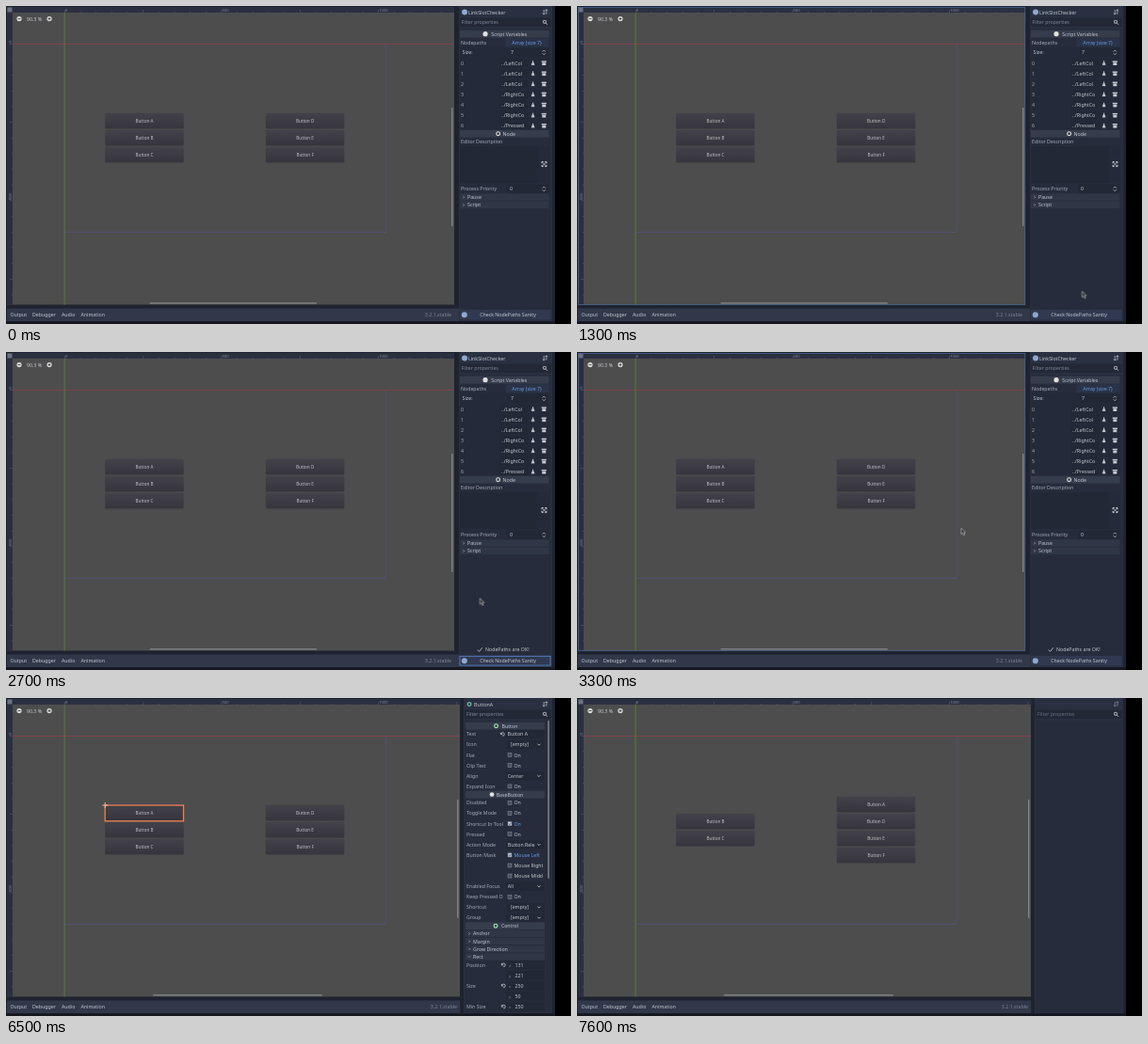
An HTML page that plays this animation: 600x338 px, repeating every 8000 ms.

```html
<!DOCTYPE html>
<html lang="en">
<head>
<meta charset="utf-8">
<title>Editor walkthrough</title>
<style>
html, body { margin: 0; width: 100%; height: 100%; overflow: hidden; background: #000; }
svg { display: block; width: 100%; height: 100%; }
text { font: 5.25px "Noto Sans", "Open Sans", sans-serif; fill: #c3c7d0; white-space: pre; }
text.dim { fill: #a5abb8; }
text.faint { fill: #7f8697; }
text.ghost { fill: #656c7c; }
text.blue { fill: #699ce8; }
text.tiny { font-size: 4.6px; fill: #c2c2c4; }
text.mark { font-size: 4.2px; fill: #858b99; }

.early, .wide, .picked, .done, .view, .focus, .press, .hover, .toast, .cursor {
  animation: 8s step-end infinite;
}
.early { animation-name: early; }
.wide { animation-name: wide; }
.picked { animation-name: picked; }
.done { animation-name: done; }
.view { animation-name: view; }
.focus { animation-name: focus; }
.press { animation-name: press; }
.hover { animation-name: hover; }
.toast { animation-name: toast; }
.cursor { animation-name: shown, move; }

@keyframes early { 0% { opacity: 1 } 81.25%, 100% { opacity: 0 } }
@keyframes wide { 0% { opacity: 0 } 81.25%, 100% { opacity: 1 } }
@keyframes picked { 0% { opacity: 0 } 81.25% { opacity: 1 } 95%, 100% { opacity: 0 } }
@keyframes done { 0% { opacity: 0 } 95%, 100% { opacity: 1 } }
@keyframes view { 0% { opacity: 0 } 2.5% { opacity: 1 } 25% { opacity: 0 } 38.75% { opacity: 1 } 81.25%, 100% { opacity: 0 } }
@keyframes focus { 0% { opacity: 0 } 25% { opacity: 1 } 38.75%, 100% { opacity: 0 } }
@keyframes press { 0% { opacity: 0 } 25% { opacity: 1 } 27.5%, 100% { opacity: 0 } }
@keyframes hover { 0% { fill: #c3c7d0 } 21.25% { fill: #e6e9ef } 25% { fill: #699ce8 } 27.5% { fill: #e6e9ef } 30%, 100% { fill: #c3c7d0 } }
@keyframes toast { 0% { opacity: 0 } 27.5% { opacity: 1 } 51.25%, 100% { opacity: 0 } }
@keyframes shown { 0% { opacity: 0 } 2.5% { opacity: 1 } 53.75%, 100% { opacity: 0 } }
@keyframes move {
  0%, 2.5% { transform: translate(12px, 70px); animation-timing-function: steps(8) }
  12.5% { transform: translate(524px, 213px); animation-timing-function: steps(3) }
  16.25% { transform: translate(536.4px, 303.3px); animation-timing-function: steps(4) }
  21.25%, 27.5% { transform: translate(533.6px, 328.3px); animation-timing-function: steps(6) }
  35%, 37.5% { transform: translate(497.2px, 248.4px); animation-timing-function: steps(3) }
  41.25% { transform: translate(407.9px, 187.3px); animation-timing-function: steps(9) }
  52.5%, 100% { transform: translate(13px, 68px) }
}
</style>
</head>
<body>
<svg id="stage" viewBox="0 0 600 338" preserveAspectRatio="none"></svg>
<script>
const BAR = '#353c4c', FIELD = '#222836', PANEL = '#262c3b', DOCK = '#293041', GAP = '#1e232f',
  FOOT = '#30384a', ICON = '#c8ccd5', LOGO = '#8fa8d0', GREEN = '#a5efac';

const rect = (x, y, w, h, fill, more = '') =>
  `<rect x="${x}" y="${y}" width="${w}" height="${h}" fill="${fill}" ${more}/>`;
const frame = (x, y, w, h, color, width) =>
  rect(x, y, w, h, 'none', `stroke="${color}" stroke-width="${width}"`);
const path = (d, color = ICON, width = .8, fill = 'none') =>
  `<path d="${d}" fill="${fill}" stroke="${color}" stroke-width="${width}"/>`;
const dot = (x, y, r, fill) => `<circle cx="${x}" cy="${y}" r="${r}" fill="${fill}"/>`;
const ring = (x, y, r, color) =>
  `<circle cx="${x}" cy="${y}" r="${r}" fill="none" stroke="${color}" stroke-width="1.1"/>`;
// y is the visual middle of the line
const text = (x, y, s, cls = '', anchor = 'start') =>
  `<text x="${x}" y="${y + 1.9}" class="${cls}" text-anchor="${anchor}">${s}</text>`;
const group = (cls, ...parts) => `<g class="${cls}">${parts.join('')}</g>`;
const range = (n, fn) => Array.from({ length: n }, (_, i) => fn(i)).join('');

const chevron = (x, y) => path(`M${x - 1.6} ${y - .8}l1.6 1.6 1.6-1.6`);
const arrow = (x, y, open) => open ? path(`M${x - 1.2} ${y - .6}l1.2 1.2 1.2-1.2`, ICON, .6)
                                   : path(`M${x - .6} ${y - 1.2}l1.2 1.2-1.2 1.2`, ICON, .6);
const spinner = (x, y) => path(`M${x - 1.5} ${y - .9}l1.5-1.5 1.5 1.5M${x - 1.5} ${y + .9}l1.5 1.5 1.5-1.5`);
const revert = (x, y) => path(`M${x - 1.6} ${y - 1.6}v1.8h1.8M${x - 1.4} ${y}a1.8 1.8 0 1 1 1.6 1.9`);
const brush = (x, y) => path(`M${x} ${y - 2.4}v2.2`, ICON, 1) +
  path(`M${x - .9} ${y - .4}h1.8l.7 2.5h-3.2z`, ICON, .3, ICON);
const trash = (x, y) => rect(x - 2.6, y - 2.2, 5.2, 1.4, ICON) + rect(x - 2, y - .4, 4, 2.8, ICON);
const header = (x, w, y, name, icon) => rect(x, y - 3.9, w, 7.8, BAR) + icon + text(x + w / 2 + 5, y, name, '', 'middle');
const section = (x, w, y, name, open) => rect(x, y - 3.7, w, 7.4, '#2f3646') + arrow(x + 4, y, open) + text(x + 8, y, name);

const dock = x =>
  rect(x, 0, 580 - x, 335, DOCK) +
  rect(x + 1, 12.5, 578 - x, 9.5, FIELD) +
  rect(x + 1, 24, 578 - x, 310, PANEL) +
  path('M571.2 4v5M569.9 7.6l1.3 1.5 1.3-1.5M573.9 8.8v-5M572.6 5.2l1.3-1.5 1.3 1.5', ICON, .7) +
  ring(572, 16.8, 1.6, '#a4aab6') + path('M573.2 18l1.8 1.9', '#a4aab6', 1);

function ruler() {
  const u = 1 / 3;
  return rect(1, 1, 486, 6, '#2a3040') + rect(1, 1, 6, 317, '#2a3040') +
    range(26, i => { const h = i % 5 ? 1 : 3; return rect(62 + i * 50 * u, 7 - h, .5, h, '#5e6473'); }) +
    range(17, i => { const h = i % 5 ? 1 : 3; return rect(7 - h, 40 + i * 50 * u, h, .5, '#5e6473'); }) +
    range(3, i => text(62.8 + i * 500 * u, 3.6, i * 500, 'mark')) +
    range(2, i => `<text class="mark" transform="translate(5.5 ${39.5 + i * 500 * u}) rotate(-90)">${i * 500}</text>`) +
    rect(1.5, 1.5, 5, 5, '#6d7382');
}

function viewport(right, thumbX, thumbW) {
  return rect(7, 7, right - 7, 310.5, '#4d4d4d') +
    path('M403.2 40.5V240.5H62', '#54547e', .8) +
    rect(7, 40, right - 7, .8, '#8c424c') +
    rect(61.7, 7, .8, 310.5, '#5f8534') +
    rect(thumbX, 315.3, thumbW, 1.3, '#898a8d', 'rx=".6"') +
    rect(right - 2.9, 108, 1.3, 126, '#898a8d', 'rx=".6"') +
    text(right - 3, 328, '3.2.1.stable', 'faint', 'end');
}

function column(x, y, letters) {
  return [...letters].map((c, i) => {
    const top = y + i * 18;
    return rect(x, top, 83.5, 16.9, 'url(#face)', 'rx="1"') +
      text(x + 41.8, top + 8.4, 'Button ' + c, 'tiny', 'middle');
  }).join('');
}

function trackerDock() {
  const paths = ['LeftCol', 'LeftCol', 'LeftCol', 'RightCo', 'RightCo', 'RightCo', 'Pressed'];
  const rows = paths.map((p, i) => {
    const y = 60.6 + i * 11.1;
    return rect(524, y - 4.8, 31, 9.6, FIELD) + text(483, y, i, 'dim') +
      text(526, y, '../' + p) + brush(559.6, y) + trash(571.3, y);
  });
  return dock(481) +
    dot(487, 6.5, 3, LOGO) + text(491, 6.6, 'LinkSlotChecker') +
    text(483.5, 17.4, 'Filter properties', 'faint') +
    header(482, 94.5, 29.7, 'Script Variables', dot(509, 29.7, 2.6, '#e0e0e0')) +
    text(483, 39, 'Nodepaths', 'dim') +
    rect(530.5, 34.4, 46, 9.2, '#2a3448') + text(553, 38.6, 'Array (size 7)', 'blue', 'middle') +
    rect(482, 43.6, 94.5, 88, '#242a39') +
    text(484.5, 49.4, 'Size:') + rect(533, 44.8, 43, 9.2, FIELD) + text(536, 49.4, '7') + spinner(571.3, 49.4) +
    rows.join('') +
    header(482, 94.5, 135.7, 'Node', ring(522.6, 135.7, 1.9, '#e0e0e0')) +
    text(483, 144.3, 'Editor Description', 'dim') +
    rect(482, 149, 83.3, 39, FIELD) + rect(566, 149, 11, 39, '#242a39') +
    path('M569.2 165.8l4.6 4.6M573.8 165.8l-4.6 4.6', ICON, .8) +
    path('M569 167.3v-1.7h1.7M572.3 165.6h1.7v1.7M574 168.9v1.7h-1.7M570.7 170.6H569v-1.7', ICON, 1) +
    text(483, 194.4, 'Process Priority', 'dim') +
    rect(532, 189.6, 45, 9.2, FIELD) + text(535, 194.4, '0') + spinner(571.3, 194.4) +
    section(482, 94.5, 203.2, 'Pause') + section(482, 94.5, 211.4, 'Script') +
    rect(482, 322.8, 96.5, 10.8, '#313950') +
    dot(486.8, 328.2, 3, LOGO) + group('press', dot(486.8, 328.2, 3, '#699ce8')) +
    text(533, 328.2, 'Check NodePaths Sanity', 'hover', 'middle') +
    group('focus', frame(481.9, 323.3, 96.2, 9.8, '#5684c8', .9)) +
    group('toast', path('M500.8 316.5l1.7 1.9 3.3-4.2'), text(509, 316.4, 'NodePaths are OK!'));
}

function field(label, y, kind, value, on) {
  const box = rect(531, y - 4.6, 41, 9.2, FIELD);
  const name = text(489, y, label, 'dim');
  switch (kind) {
    case 'check':
      return name + rect(533, y - 2, 4, 4, on ? ICON : '#4a5060', 'stroke="#8a909d" stroke-width=".5"') +
        (on ? path(`M533.8 ${y}l1 1.1 1.7-2.2`, '#2a4f8a') : '') + text(539.5, y, value, on ? 'blue' : '');
    case 'list':
      return name + box + chevron(566, y) +
        (value === '[empty]' ? text(545.5, y, value, '', 'middle') : text(532.8, y, value));
    case 'axis':
      return name + box + text(534, y, label ? 'x' : 'y', 'mark') + text(540.5, y, value);
    default:
      return name + box + text(532.5, y, value);
  }
}

function buttonDock() {
  const upper = [
    ['Text', 'text', 'Button A'], ['Icon', 'list', '[empty]'], ['Flat', 'check', 'On'],
    ['Clip Text', 'check', 'On'], ['Align', 'list', 'Center'], ['Expand Icon', 'check', 'On']];
  const lower = [
    ['Disabled', 'check', 'On'], ['Toggle Mode', 'check', 'On'], ['Shortcut In Tool', 'check', 'On', true],
    ['Pressed', 'check', 'On'], ['Action Mode', 'list', 'Button Rele'], ['Button Mask', 'check', 'Mouse Left', true],
    ['', 'check', 'Mouse Right'], ['', 'check', 'Mouse Midd'], ['Enabled Focus', 'list', 'All'],
    ['Keep Pressed O', 'check', 'On'], ['Shortcut', 'list', '[empty]'], ['Group', 'list', '[empty]']];
  const sizes = [
    ['Position', 'axis', 131], ['', 'axis', 221], ['Size', 'axis', 250], ['', 'axis', 50], ['Min Size', 'axis', 250]];
  const fields = (list, y) => list.map(([label, ...rest], i) => field(label, y + i * 11.1, ...rest)).join('');
  return ring(492, 6.6, 1.9, '#8fd6b4') + text(497, 6.6, 'ButtonA') +
    text(489, 17.4, 'Filter properties', 'faint') +
    header(488, 84, 29.7, 'Button', ring(520.5, 29.7, 1.9, GREEN)) +
    fields(upper, 38.4) + revert(527, 38.4) +
    header(488, 84, 102.6, 'BaseButton', dot(516, 102.6, 2.4, '#e0e0e0')) +
    fields(lower, 111.4) +
    header(488, 84, 242.2, 'Control', ring(520, 242.2, 1.9, GREEN)) +
    ['Anchor', 'Margin', 'Grow Direction', 'Rect'].map((s, i) => section(488, 84, 250.4 + i * 8.2, s, s === 'Rect')).join('') +
    fields(sizes, 283.6) + range(3, i => revert(528, 283.6 + i * 22.2)) +
    rect(575.4, 24, 1.5, 168, '#80858f', 'rx=".7"');
}

const zoomIcon = (x, d) => dot(x, 13.6, 2.6, '#dcdcdc') + path(d, '#404040', .9);
const startButtons = column(105.2, 113.7, 'ABC') + column(275.8, 113.7, 'DEF');

document.getElementById('stage').innerHTML =
  `<defs><linearGradient id="face" x2="0" y2="1"><stop stop-color="#434149"/><stop offset="1" stop-color="#36343c"/></linearGradient></defs>` +
  rect(0, 0, 583, 338, '#14171e') + rect(0, 0, 583, 335.5, GAP) + ruler() +
  rect(1, 321.5, 480, 13.5, FOOT) +
  group('early', rect(476, 0, 5, 321, GAP), viewport(476, 152.5, 177.5), trackerDock(), startButtons,
    group('view', frame(1.4, 1.4, 474.4, 316, '#4c6a99', .7))) +
  group('wide', rect(481, 321.5, 1.5, 13.5, FOOT), rect(482.5, 0, 4, 336, GAP),
    viewport(482, 156, 180), dock(486)) +
  group('picked', startButtons, frame(105.2, 114, 83.3, 16.8, '#ee7f54', 1.3),
    path('M102.3 114h6M105.3 111v6', '#f0b69c', 1), buttonDock()) +
  group('done', column(105.2, 122.7, 'BC'), column(275.8, 104.7, 'ADEF'),
    text(489, 17.4, 'Filter properties', 'ghost'),
    rect(568, 2, 9, 9, DOCK, 'opacity=".4"')) +
  zoomIcon(14, 'M12.6 13.6h2.8') + zoomIcon(46, 'M44.6 13.6h2.8M46 12.2v2.8') + text(30, 13.7, '90.3 %', '', 'middle') +
  [[4.5, 'Output'], [28, 'Debugger'], [59, 'Audio'], [79.5, 'Animation']].map(([x, s]) => text(x, 328.2, s)).join('') +
  group('cursor', path('M0 0v6.4l1.5-1.3 1.2 2.5 1.1-.6-1.2-2.4 2-.2z', '#d4d4d4', .55, '#33363e'));
</script>
</body>
</html>
```
